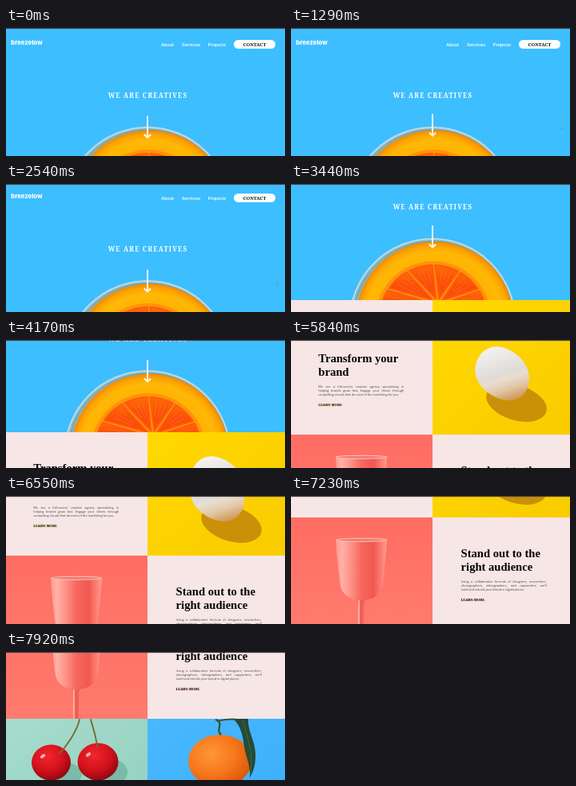
An HTML page for the animation above (7990 ms loop, 349x161 px).

```html
<!DOCTYPE html>
<html lang="en">
<head>
<meta charset="utf-8">
<title>Creative agency landing page</title>
<style>
  html, body { margin: 0; width: 100%; height: 100%; overflow: hidden; background: #3dbeff; }
  svg { display: block; width: 100vw; height: 100vh; }
  .nav { font: 500 6px Roboto, sans-serif; fill: #fff; }
  .serif { font-family: "Noto Serif", serif; font-weight: 900; }
  .title { font: bold 14.6px "Liberation Serif", serif; fill: #050304; }
  .copy { font: 500 3.8px/5.25px "Open Sans", sans-serif; color: #453f3f; }
  .copy div { white-space: nowrap; text-align: justify; text-align-last: justify; }
  .copy div:last-child { text-align-last: left; }
</style>
</head>
<body>
<svg viewBox="0 0 349 161" xmlns="http://www.w3.org/2000/svg">
  <defs>
    <radialGradient id="juice" cx=".5" cy=".5" r=".5">
      <stop offset=".68" stop-color="#ffb000"/>
      <stop offset=".87" stop-color="#ffb806"/>
      <stop offset=".95" stop-color="#ffa200"/>
      <stop offset="1" stop-color="#ee8a00"/>
    </radialGradient>
    <linearGradient id="pulp" x2="0" y2="1">
      <stop offset="0" stop-color="#ff6a06"/>
      <stop offset=".5" stop-color="#fb4d0b"/>
    </linearGradient>
    <linearGradient id="yellow" x2="1" y2="1">
      <stop offset="0" stop-color="#ffd800"/>
      <stop offset="1" stop-color="#f9cb00"/>
    </linearGradient>
    <linearGradient id="egg" x1=".3" y1="0" x2=".62" y2="1">
      <stop offset="0" stop-color="#f4f2f0"/>
      <stop offset=".52" stop-color="#dfdbd7"/>
      <stop offset=".62" stop-color="#eaddd0"/>
      <stop offset=".8" stop-color="#e2c6a8"/>
      <stop offset="1" stop-color="#cf9a58"/>
    </linearGradient>
    <linearGradient id="coral" x2="0" y2="1">
      <stop offset="0" stop-color="#ff6d63"/>
      <stop offset="1" stop-color="#ff7b6e"/>
    </linearGradient>
    <linearGradient id="cup">
      <stop offset="0" stop-color="#ff9b90"/>
      <stop offset=".12" stop-color="#ffb1a6"/>
      <stop offset=".26" stop-color="#ff988d"/>
      <stop offset=".5" stop-color="#f6685f"/>
      <stop offset=".74" stop-color="#f0584f"/>
      <stop offset=".88" stop-color="#fb7c72"/>
      <stop offset="1" stop-color="#ff9d92"/>
    </linearGradient>
    <linearGradient id="teal" x2="1" y2="1">
      <stop offset="0" stop-color="#a6dccd"/>
      <stop offset="1" stop-color="#93d0be"/>
    </linearGradient>
    <radialGradient id="cherry" cx=".4" cy=".32" r=".72">
      <stop offset="0" stop-color="#f0262c"/>
      <stop offset=".55" stop-color="#d5121c"/>
      <stop offset="1" stop-color="#8b0610"/>
    </radialGradient>
    <linearGradient id="blue" x2="1" y2="1">
      <stop offset="0" stop-color="#48b8ff"/>
      <stop offset="1" stop-color="#3caefa"/>
    </linearGradient>
    <radialGradient id="fruit" cx=".36" cy=".36" r=".72">
      <stop offset="0" stop-color="#ff9636"/>
      <stop offset=".55" stop-color="#f6771a"/>
      <stop offset="1" stop-color="#d8540a"/>
    </radialGradient>
    <clipPath id="heroBox"><rect width="349" height="202"/></clipPath>
    <clipPath id="eggBox"><rect x="177" y="202" width="172" height="141"/></clipPath>
    <clipPath id="cupBox"><rect y="343" width="177" height="141"/></clipPath>
  </defs>

  <g id="page">
    <!-- hero -->
    <g clip-path="url(#heroBox)">
      <rect y="-2" width="349" height="206" fill="#3dbeff"/>
      <circle cx="177" cy="228" r="103" fill="#86b9c8" stroke="#bfd9df" stroke-width="2"/>
      <circle cx="178" cy="228" r="100" fill="none" stroke="#6f98a0" stroke-width="1"/>
      <circle cx="179.500" cy="227" r="98.500" fill="url(#juice)"/>
      <circle cx="178" cy="225" r="72" fill="#ff930c"/>
      <g id="slice" fill="url(#pulp)" stroke="#ff5d0a" stroke-width="2" stroke-linejoin="round"/>
    </g>
    <text x="6.300" y="20.600" fill="#fff" font-family="Inter, sans-serif" font-weight="800" font-size="7.700">breezelow</text>
    <g class="nav">
      <text x="194" y="22.700">About</text>
      <text x="220" y="22.700">Services</text>
      <text x="252.800" y="22.700">Projects</text>
    </g>
    <rect x="285" y="15" width="52" height="11" rx="5.500" fill="#fff"/>
    <text class="serif" x="311" y="22.600" font-size="5.900" text-anchor="middle" fill="#111">CONTACT</text>
    <text class="serif" x="177.500" y="88" font-size="8" letter-spacing="1.200" text-anchor="middle" fill="#fff">WE ARE CREATIVES</text>
    <path id="arrow" d="M177 109V136.300M172.900 132.600L177 136.500L181.100 132.600" fill="none" stroke="#fff" stroke-width="1.900"/>

    <!-- egg row -->
    <rect y="202" width="177" height="141" fill="#f6e6e6"/>
    <g clip-path="url(#eggBox)">
      <rect x="177" y="202" width="172" height="141" fill="url(#yellow)"/>
      <ellipse cx="282" cy="303" rx="39" ry="22" transform="rotate(17 282 303)" fill="#c58a08" opacity=".9"/>
      <path d="M232 252C238 234 254 229 267 234C285 240 298 256 298 272C298 290 286 301 272 300C256 299 241 289 234 276C230 268 229 260 232 252Z" fill="url(#egg)"/>
    </g>
    <g class="title">
      <text x="34.300" y="252">Transform your</text>
      <text x="34.300" y="269">brand</text>
    </g>
    <foreignObject x="34.300" y="279.800" width="107" height="18">
      <div xmlns="http://www.w3.org/1999/xhtml" class="copy">
        <div>We are a full-service creative agency specializing in</div>
        <div>helping brands grow fast. Engage your clients through</div>
        <div>compelling visuals that do most of the marketing for you.</div>
      </div>
    </foreignObject>
    <rect x="34" y="305.700" width="31" height="1.700" rx=".8" fill="#fad400" opacity=".35"/>
    <text class="serif" x="34.300" y="306.600" font-size="4.250" fill="#050505">LEARN MORE</text>

    <!-- cup row -->
    <g clip-path="url(#cupBox)">
      <rect y="343" width="177" height="141" fill="url(#coral)"/>
      <path d="M81 443H94Q90.700 450 90.700 458V486H83.300V458Q83.300 450 81 443Z" fill="#ee6058"/>
      <path d="M84.800 447V486" stroke="#ffaa9f" stroke-width="2.400"/>
      <path d="M56 371C57 387 59 407 61.500 427C63.500 441 75 447 87.500 447.500C101 447 113 441 115 427C117 407 119 387 120 371Z" fill="url(#cup)"/>
      <ellipse cx="88" cy="371.300" rx="32" ry="2" fill="#f07a70" stroke="#ffc4ba" stroke-width="1"/>
    </g>
    <rect x="177" y="343" width="172" height="141" fill="#f6e6e6"/>
    <g class="title">
      <text x="212.600" y="393">Stand out to the</text>
      <text x="212.600" y="410">right audience</text>
    </g>
    <foreignObject x="212.600" y="420.800" width="107" height="18">
      <div xmlns="http://www.w3.org/1999/xhtml" class="copy">
        <div>Using a collaborative formula of designers, researchers,</div>
        <div>photographers, videographers, and copywriters, we'll</div>
        <div>build and extend your brand in digital places.</div>
      </div>
    </foreignObject>
    <rect x="212.400" y="446.700" width="31" height="1.700" rx=".8" fill="#fe7867" opacity=".35"/>
    <text class="serif" x="212.600" y="447.600" font-size="4.250" fill="#050505">LEARN MORE</text>

    <!-- fruit row -->
    <rect y="484" width="177" height="141" fill="url(#teal)"/>
    <g fill="#5fa592" opacity=".55">
      <ellipse cx="70" cy="554" rx="25" ry="16"/>
      <ellipse cx="129" cy="551" rx="23" ry="17"/>
    </g>
    <ellipse cx="56.500" cy="539" rx="24.500" ry="22.500" fill="url(#cherry)"/>
    <ellipse cx="115" cy="538" rx="25.500" ry="23.500" fill="url(#cherry)"/>
    <g fill="none" stroke="#7a6a38" stroke-width="1.900" stroke-linecap="round">
      <path d="M92 485C88 501 78 515 67 528"/>
      <path d="M106 485C109 496 113 507 114 519"/>
    </g>
    <g fill="#ffd5d2" opacity=".8">
      <ellipse cx="46" cy="531" rx="3.500" ry="2" transform="rotate(-40 46 531)"/>
      <ellipse cx="103" cy="529" rx="3.500" ry="2" transform="rotate(-40 103 529)"/>
    </g>
    <rect x="177" y="484" width="172" height="141" fill="url(#blue)"/>
    <ellipse cx="267.500" cy="537" rx="39.500" ry="33" fill="url(#fruit)"/>
    <path d="M262 485Q269 487 267 494T269 504" fill="none" stroke="#31512f" stroke-width="2.200"/>
    <path d="M264 487Q284 482 300 487" fill="none" stroke="#31512f" stroke-width="1.800"/>
    <path d="M284 484H303C302 499 311 510 312 527C312.500 540 310 550 305 558C306 542 300 532 298 519C296 505 294 493 284 484Z" fill="#264a36"/>
    <path d="M296 485C301 506 309 520 306 553" fill="none" stroke="#47704a" stroke-width=".8"/>
  </g>

  <g id="pointer">
    <path d="M338.500 123L341 125.300L339.800 125.500L339.400 127Z" fill="#fff" stroke="#356b88" stroke-width=".5"/>
  </g>
  <rect width="349" height="1.100" fill="#4b4648"/>
</svg>
<script>
  const LOOP = 7990, GLIDE = 560, NOTCH = 57;
  const $ = id => document.getElementById(id);
  // Start time and distance of each wheel notch
  const notches = [[2485, 29], ...[3283, 4230, 5003, 5697, 6465, 7203, 7754].map(t => [t, NOTCH])];

  // cubic-bezier(.25, .1, .25, 1)
  function ease(x) {
    if (x <= 0) return 0;
    if (x >= 1) return 1;
    let lo = 0, hi = 1;
    for (let i = 0; i < 20; i++) {
      const u = (lo + hi) / 2;
      if (0.75 * u * (1 - u) + u ** 3 < x) lo = u; else hi = u;
    }
    return 0.3 * lo * (1 - lo) ** 2 + 3 * lo * lo * (1 - lo) + lo ** 3;
  }

  function drawSlice() {
    const hub = [184, 206], r = 67, step = 0.5;
    const rim = a => [178 + r * Math.cos(a), 225 + r * Math.sin(a)];
    const toward = (p, k) => hub.map((h, i) => h + (p[i] - h) * k);
    let paths = "";
    for (let i = 0; i < 8; i++) {
      const a = -Math.PI - 0.42 + i * step;
      const tip = toward(rim(a + step / 2), 0.12);
      paths += `<path d="M${tip}L${rim(a + 0.025)}A${r} ${r} 0 0 1 ${rim(a + step - 0.025)}Z"/>`;
      for (const k of [0.3, 0.5, 0.7]) {
        const p = rim(a + step * k);
        paths += `<path d="M${toward(p, 0.5)}L${toward(p, 0.9)}" stroke="#ff8a2a" stroke-width=".7" opacity=".6"/>`;
      }
    }
    $("slice").innerHTML = paths;
  }

  function render(t) {
    // The page scrolls by whole pixels
    const scroll = Math.round(notches.reduce((sum, [at, d]) => sum + d * ease((t - at) / GLIDE), 0));
    const bob = 0.6 + 1.6 * Math.cos((t - 330) / 1000 * Math.PI);
    $("page").setAttribute("transform", `translate(0 ${-scroll})`);
    $("arrow").setAttribute("transform", `translate(0 ${bob.toFixed(2)})`);
    $("pointer").setAttribute("visibility", t > 1100 && t < 2850 ? "visible" : "hidden");
  }

  drawSlice();
  render(0);
  const start = performance.now();
  (function tick() {
    render((performance.now() - start) % LOOP);
    requestAnimationFrame(tick);
  })();
</script>
</body>
</html>
```
